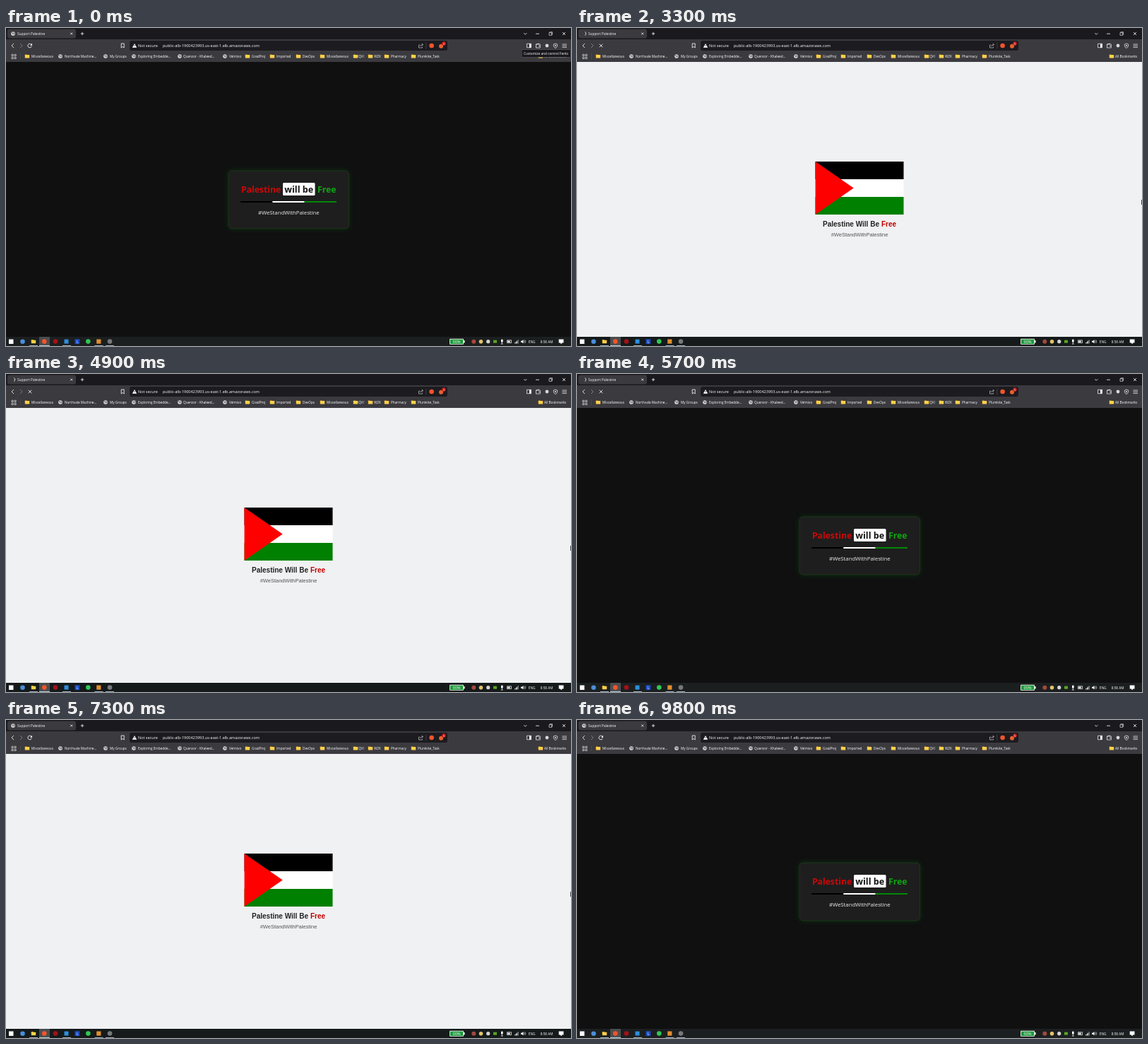
An HTML page with a canvas that plays this animation: 800x450 px, repeating every 9900 ms.

```html
<!DOCTYPE html>
<html lang="en">
<head>
<meta charset="utf-8">
<title>Support page reload</title>
<style>
  html, body { margin: 0; width: 100%; height: 100%; overflow: hidden; background: #111; }
  canvas { display: block; }
</style>
</head>
<body>
<canvas id="stage" width="800" height="450"></canvas>
<script>
const ctx = document.getElementById('stage').getContext('2d');
const LOOP = 9900, STEP = 100;
const UI = '"Open Sans", "Noto Sans", sans-serif';
const ARIAL = '"Liberation Sans", Arial, sans-serif';
const WHITE = '#fff', GREY = '#8b8a90', TOOLBAR = '#3b3a3f';

// [reload pressed, answer shown]; each answer swaps the dark and light page
const reloads = [[900, 2400], [3000, 3500], [3900, 4300], [4700, 5200],
                 [5500, 5900], [6100, 6400], [6700, 7000], [7500, 8000]];

function box(x, y, w, h, color, r = 0) {
  ctx.fillStyle = color;
  ctx.beginPath();
  ctx.roundRect(x, y, w, h, r);
  ctx.fill();
}

function dot(x, y, r, color) {
  ctx.fillStyle = color;
  ctx.beginPath();
  ctx.arc(x, y, r, 0, 7);
  ctx.fill();
}

function shape(path, color) {
  ctx.fillStyle = color;
  ctx.fill(new Path2D(path));
}

function stroke(path, color = WHITE, width = 0.8) {
  ctx.strokeStyle = color;
  ctx.lineWidth = width;
  ctx.stroke(new Path2D(path));
}

function arc(x, y, r, from, to, color = WHITE, width = 0.8) {
  ctx.strokeStyle = color;
  ctx.lineWidth = width;
  ctx.beginPath();
  ctx.arc(x, y, r, from, to);
  ctx.stroke();
}

function text(str, x, y, size, color = WHITE, align = 'left', weight = 500, family = UI) {
  ctx.font = `${weight} ${size}px ${family}`;
  ctx.textAlign = align;
  ctx.fillStyle = color;
  ctx.fillText(str, x, y);
}

function cross(x, y, r, width = 0.8) {
  stroke(`M${x - r} ${y - r}l${2 * r} ${2 * r}m0 ${-2 * r}l${-2 * r} ${2 * r}`, WHITE, width);
}

function globe(x, y) {
  dot(x, y, 2.8, '#e4e4e6');
  stroke(`M${x - 2} ${y - 1.2}l2 .8l-.4 1.7M${x + .4} ${y - 2}l1.6 1.6l-1 1.6`, '#45444a', 0.9);
}

function folder(x, y) {
  box(x - 3.2, y - 2.6, 3, 2, '#e0a800', 0.5);
  box(x - 3.2, y - 1.9, 6.4, 4.5, '#ffd04a', 0.5);
}

const bookmarks = [
  [folder, 30, 36, 'Miscellaneous'], [globe, 77, 83, 'Northvale Machine...'],
  [globe, 141, 147, 'My Groups'], [globe, 181, 187, 'Exploring Embedde...'],
  [globe, 246, 251, 'Quenzor - Khaleed...'], [globe, 310, 316, 'Velmixo'],
  [folder, 342, 348, 'GradProj'], [folder, 377, 383, 'Imported'],
  [folder, 414, 420, 'DevOps'], [folder, 448, 454, 'Miscellaneous'],
  [folder, 495, 499, 'QVI'], [folder, 516, 521, 'WZK'],
  [folder, 539, 545, 'Pharmacy'], [folder, 577, 583, 'Plumkite_Task'],
  [folder, 757, 762, 'All Bookmarks']
];

function drawTabStrip(t, loading) {
  box(0, 0, 800, 16, '#1a191e');
  box(2, 1.5, 97, 13, TOOLBAR, 3);
  if (loading) {
    const turn = (t - 100) / 800 * 2 * Math.PI;
    arc(10, 8, 2.7, turn - 1.2, turn + 1.1);
  } else {
    globe(10, 8);
  }
  text('Support Palestine', 16, 9.8, 4.75);
  cross(92.7, 8, 1.4);
  stroke('M105.8 8h4.4M108 5.8v4.4');
  stroke('M733.3 7.2l2 2l2-2M750 8.2h5');
  stroke('M769 6.7h3.6v3.6h-3.6zM770 6.7v-1h3.6v3.6h-1', WHITE, 0.6);
  cross(790, 8, 2);
}

function drawToolbar(loading) {
  box(0, 16, 800, 32, TOOLBAR);
  stroke('M11 22l-3 3l3 3', WHITE);
  stroke('M20 22l3 3l-3 3', GREY);
  if (loading) {
    cross(34, 25, 2.3);
  } else {
    arc(33.7, 25, 2.8, 0.3, 5.6);
    shape('M37 21.7v3h-3z', WHITE);
  }
  stroke('M163.2 22h4v6l-2-1.6l-2 1.6z');

  box(175, 18, 450, 14, '#1c1b1f', 3);
  shape('M182 22l3.2 5.8h-6.4z', WHITE);
  stroke('M182 24v2', '#1c1b1f', 0.7);
  text('Not secure', 187, 27, 5.5);
  text('public-alb-1900423993.us-east-1.elb.amazonaws.com', 222, 27, 5.5);
  stroke('M586 24h-1.5v4h5v-1.5M586.5 26q.5-2.5 4-2.5m-1.7-1.7l1.7 1.7l-1.7 1.7', '#c8c8cc', 0.7);
  stroke('M594.8 20.5v9', '#56555b', 0.6);
  dot(602.6, 25, 3.3, '#f2552c');
  dot(616, 25.8, 3, '#e8602c');
  dot(620, 22, 2.7, '#d81e1e');
  text('5', 620, 23.5, 4, WHITE, 'center');

  stroke('M737.5 22.3h6v5.4h-6z', WHITE, 0.7);
  box(741, 22.3, 2.5, 5.4, WHITE);
  stroke('M750.5 23h5.8v5h-5.8zM750.5 23l4-1v1M754 25.5h2.3', WHITE, 0.7);
  dot(766, 25, 2.4, '#d8d8dc');
  stroke('M778 22l2.6 1v2.5q-.6 2-2.6 3q-2-1-2.6-3v-2.5z', WHITE, 0.7);
  dot(778, 25, 0.9, WHITE);
  stroke('M787.5 23h6.5m-6.5 2.2h6.5m-6.5 2.2h6.5', WHITE, 0.7);

  stroke('M8 37.3h2.2v2.2h-2.2zm4 0h2.2v2.2h-2.2zm-4 4h2.2v2.2h-2.2zm4 0h2.2v2.2h-2.2z', WHITE, 0.6);
  stroke('M20.5 36v8', '#56555b', 0.5);
  for (const [icon, x, textX, label] of bookmarks) {
    icon(x, 40);
    text(label, textX, 41.5, 4.7);
  }
}

function drawDarkPage() {
  box(0, 48, 800, 389, '#101011');
  ctx.shadowColor = 'rgba(0, 128, 0, .3)';
  ctx.shadowBlur = 8;
  box(315, 202, 170.5, 82, '#1e1e1e', 5);
  ctx.shadowBlur = 0;
  ctx.strokeStyle = '#1d3f1b';
  ctx.lineWidth = 0.7;
  ctx.stroke();

  text('Palestine', 361, 233.3, 12.2, '#cc0808', 'center', 700);
  box(392, 219, 45.5, 18, '#fff', 1.5);
  text('will be', 414.7, 233.3, 12.5, '#111', 'center', 700);
  text('Free', 454.3, 233.3, 12.2, '#0fa512', 'center', 700);
  ['#000', '#fff', '#008a08'].forEach((color, i) => box(332 + i * 45.33, 245, 45.33, 2.1, color));
  text('#WeStandWithPalestine', 400.3, 264.4, 7.77, '#eee', 'center', 400);
}

function drawLightPage() {
  box(0, 48, 800, 389, '#f0f1f2');
  ['#000', '#fff', '#008000'].forEach((color, i) => box(337.5, 189 + i * 25, 125, 25, color));
  shape('M337.5 189L391.7 226.5L337.5 264z', '#f00');
  text('Palestine Will Be ', 348, 281.3, 10, '#222', 'left', 700, ARIAL);
  text('Free', 452, 281.3, 10, '#c00000', 'right', 700, ARIAL);
  text('#WeStandWithPalestine', 400, 294.5, 7.5, '#555', 'center', 400, ARIAL);
  box(799, 243, 1, 7, '#444');
}

function drawTaskbar(light) {
  box(0, 437, 800, 13, light ? '#151a1b' : '#1c1f20');
  box(47, 437, 15, 13, '#4a4d4e');
  box(4, 440.5, 6.5, 6.5, WHITE);
  dot(23.5, 443.7, 3.3, '#4a8fd8');
  folder(39, 443.6);
  dot(54.3, 443.6, 3.3, '#f2552c');
  dot(70, 443.6, 3.3, '#a31219');
  box(82.5, 440.6, 6, 6, '#2b8fdc');
  box(97.5, 440.3, 6.8, 6.8, '#1d4fc4');
  text('L', 101, 445.5, 5, WHITE, 'center');
  dot(116.3, 443.6, 3.3, '#2fc956');
  box(128.2, 440.5, 6.2, 6.2, '#e0902e');
  dot(147, 443.6, 3.3, '#77797b');
  for (const x of [33, 80, 125.5, 141]) box(x, 449, 12, 1, '#9fb4c4');
  box(47, 449, 15, 1, '#b9cedd');

  box(628, 439.8, 20, 8, WHITE, 1);
  box(648, 442, 1.5, 3.6, WHITE);
  box(628.8, 440.6, 18.4, 6.4, '#1f9a3c');
  text('90%', 638, 445.8, 5.6, WHITE, 'center');
  dot(662.3, 443.7, 3, '#a5483c');
  dot(672.5, 443.7, 2.8, '#e3c46a');
  dot(682.7, 443.7, 2.6, '#d5d5d5');
  box(690, 441.7, 5, 4, '#58a820');
  box(701, 440.5, 2.6, 4.2, WHITE, 1.3);
  stroke('M702.3 444.5v2.6m-1.5 0h3', WHITE, 0.7);
  stroke('M709.5 441.8h6v3.8h-6z', WHITE, 0.7);
  box(710.3, 442.6, 3.4, 2.2, WHITE);
  for (let i = 0; i < 4; i++) box(720.3 + i * 1.5, 445 - i * 1.3, 1, 1.6 + i * 1.3, i < 3 ? WHITE : GREY);
  shape('M729 442.7h1.5l2-1.8v5.6l-2-1.8h-1.5z', WHITE);
  arc(732.2, 443.7, 1.8, -0.8, 0.8, WHITE, 0.6);
  arc(732.2, 443.7, 3.4, -0.8, 0.8, WHITE, 0.6);
  text('ENG', 739.8, 445.5, 4.8);
  text('8:58 AM', 756.7, 445.5, 4.7);
  shape('M782.7 440.5h6.8v5h-2l-1.4 1.7l-1.4-1.7h-2z', WHITE);
}

function drawTooltip() {
  box(730, 30.5, 69.5, 11, '#5a595e');
  box(730.5, 31, 68.5, 10, '#18171b');
  text('Customize and control Fenlo', 733, 37.8, 4.76);
}

function draw(now) {
  const t = Math.floor(now % LOOP / STEP) * STEP;
  const light = reloads.filter(([, shown]) => t >= shown).length % 2 === 1;
  const loading = reloads.some(([pressed, shown]) => t >= pressed && t < shown);
  drawTabStrip(t, loading);
  drawToolbar(loading);
  if (light) drawLightPage(); else drawDarkPage();
  drawTaskbar(light);
  if (t < 300) drawTooltip();
}

const start = performance.now();
function frame() {
  draw(performance.now() - start);
  requestAnimationFrame(frame);
}
frame();
</script>
</body>
</html>
```
